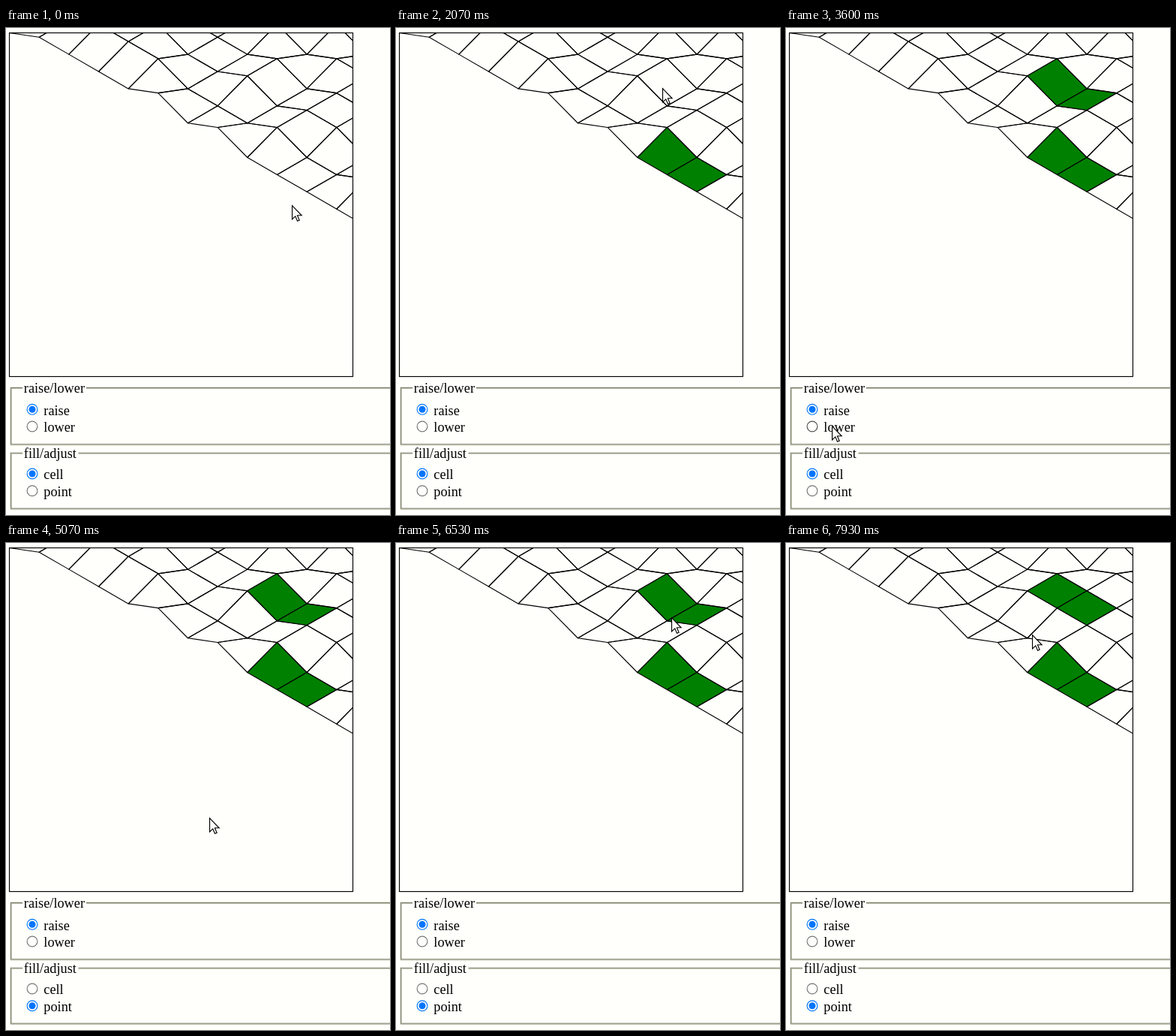
Recreate the animation shown at these times as an HTML page. Size 512 px wide and 649 px high, loop 8 s.

```html
<!DOCTYPE html>
<html lang="en">
<head>
<meta charset="utf-8">
<title>Terrain editor</title>
<style>
  html, body { margin: 0; width: 100%; height: 100%; overflow: hidden; background: #fffffb; }
  svg { display: block; }
  text { font: 18.3px "Liberation Serif", serif; }
</style>
</head>
<body>
<svg id="stage" width="512" height="649" viewBox="0 0 512 649">
  <clipPath id="view"><rect x="4.5" y="6.5" width="458" height="458"/></clipPath>
  <g id="mesh" clip-path="url(#view)" stroke="#000" stroke-width="1.15" stroke-linejoin="round"></g>
  <rect x="4.5" y="6.5" width="458" height="458" fill="none" stroke="#000" stroke-width="1.15"/>
  <g id="form"></g>
  <path id="cursor" d="M.5 .5V16.5L4.2 13L6.6 18.6L8.9 17.6L6.5 12H11.5Z"
        fill="#fffffb" stroke="#000" stroke-width="1"/>
</svg>
<script>
const LOOP = 8000, STEPS = 120, SCALE = 1.145;
const EDGE = 40 * SCALE, DX = EDGE * Math.cos(Math.PI / 6), DY = EDGE / 2, RISE = 15 * SCALE;

// Heights of row j, starting at column i = j.
const heights = ['0111121211111', '12221112112', '221121221', '1112122', '12122', '221'];

// Click times in ms.
const filled = { '9,0': 600, '8,0': 1400, '6,2': 2170, '7,2': 2600 };
const raised = { '7,2': 6650, '7,3': 7270 };
const POINT_MODE = 4270;

// Cursor stops: time, x, y.
const stops = [
  [0, 381, 236], [500, 399, 193], [720, 399, 193], [1000, 374, 174], [1200, 360, 163],
  [1500, 360, 163], [2000, 355, 80], [2200, 355, 80], [2450, 398, 93], [2680, 398, 93],
  [3530, 60, 527], [3600, 61, 530], [4070, 62, 622], [4330, 62, 622], [5070, 271, 366],
  [6400, 367, 99], [6720, 367, 99], [7070, 401, 79], [7330, 401, 79], [7870, 328, 122], [8000, 328, 122]
];

const byId = id => document.getElementById(id);
function add(parent, tag, attrs, text) {
  const el = document.createElementNS('http://www.w3.org/2000/svg', tag);
  setAll(el, attrs);
  if (text) el.textContent = text;
  parent.append(el);
  return el;
}
function setAll(el, attrs) {
  for (const name in attrs) el.setAttribute(name, attrs[name]);
}

const cells = [];
for (let i = 0; i < 12; i++)
  for (let j = 0; j <= Math.min(i, 6); j++)
    cells.push({ i, j, el: add(byId('mesh'), 'polygon', {}) });

function vertex(i, j, t) {
  const h = +(heights[j]?.[i - j] ?? 1) + (t >= raised[[i, j]] ? 1 : 0);
  return [4.5 + (i + j) * DX, 6.5 + (i - j) * DY - h * RISE];
}

const form = byId('form'), radios = [];
function fieldset(top, bottom, legend, gapEnd) {
  const line = (color, d) => add(form, 'path', { d, fill: 'none', stroke: color, 'stroke-width': 1.15 });
  const frame = o => `M22 ${top + o}H${6.3 + o}V${bottom - o}H520M${gapEnd} ${top + o}H520`;
  line('#c4c4b4', frame(1.1));
  line('#7e7e6c', `M22 ${top}H6.3V${bottom}M${gapEnd} ${top}H520M7 ${bottom - 1.1}H520`);
  line('#c4c4b4', `M6 ${bottom}H520`);
  add(form, 'text', { x: 23.8, y: top + 6.7 }, legend);
}
function radio(y, label, isOn) {
  const ring = add(form, 'circle', { cx: 35, cy: y, r: 6.9, fill: '#fffffb', 'stroke-width': 1.15 });
  const dot = add(form, 'circle', { cx: 35, cy: y, r: 4.5 });
  add(form, 'text', { x: 50.3, y: y + 7.2 }, label);
  radios.push({ y, ring, dot, isOn });
}
fieldset(479.3, 555.8, 'raise/lower', 107);
radio(508.3, 'raise', () => true);
radio(531, 'lower', () => false);
fieldset(566.2, 641.3, 'fill/adjust', 96.5);
radio(594, 'cell', t => t < POINT_MODE);
radio(616.7, 'point', t => t >= POINT_MODE);

function cursorAt(t) {
  const k = Math.max(1, stops.findIndex(s => s[0] >= t));
  const [t0, x0, y0] = stops[k - 1], [t1, x1, y1] = stops[k];
  const u = (t - t0) / (t1 - t0), e = u * u * (3 - 2 * u);
  return [x0 + (x1 - x0) * e, y0 + (y1 - y0) * e];
}

function draw(t) {
  for (const { i, j, el } of cells) {
    const corners = [[i, j], [i + 1, j], [i + 1, j + 1], [i, j + 1]];
    setAll(el, {
      points: corners.map(([a, b]) => vertex(a, b, t)).join(' '),
      fill: t >= filled[[i, j]] ? '#008000' : 'none'
    });
  }
  const [x, y] = cursorAt(t);
  for (const { y: cy, ring, dot, isOn } of radios) {
    const on = isOn(t), hover = x > 27 && x < 94 && Math.abs(y - cy) < 11;
    const color = on ? (hover ? '#005cc8' : '#0075ff') : (hover ? '#4f4f4f' : '#767676');
    setAll(ring, { stroke: color });
    setAll(dot, { fill: on ? color : 'none' });
  }
  setAll(byId('cursor'), { transform: `translate(${x} ${y}) scale(${SCALE})` });
}

const start = performance.now();
function tick() {
  const t = (performance.now() - start) % LOOP;
  const step = Math.min(STEPS - 1, Math.floor((t + 5) * STEPS / LOOP));
  draw(step * LOOP / STEPS);
  requestAnimationFrame(tick);
}
tick();
</script>
</body>
</html>
```
